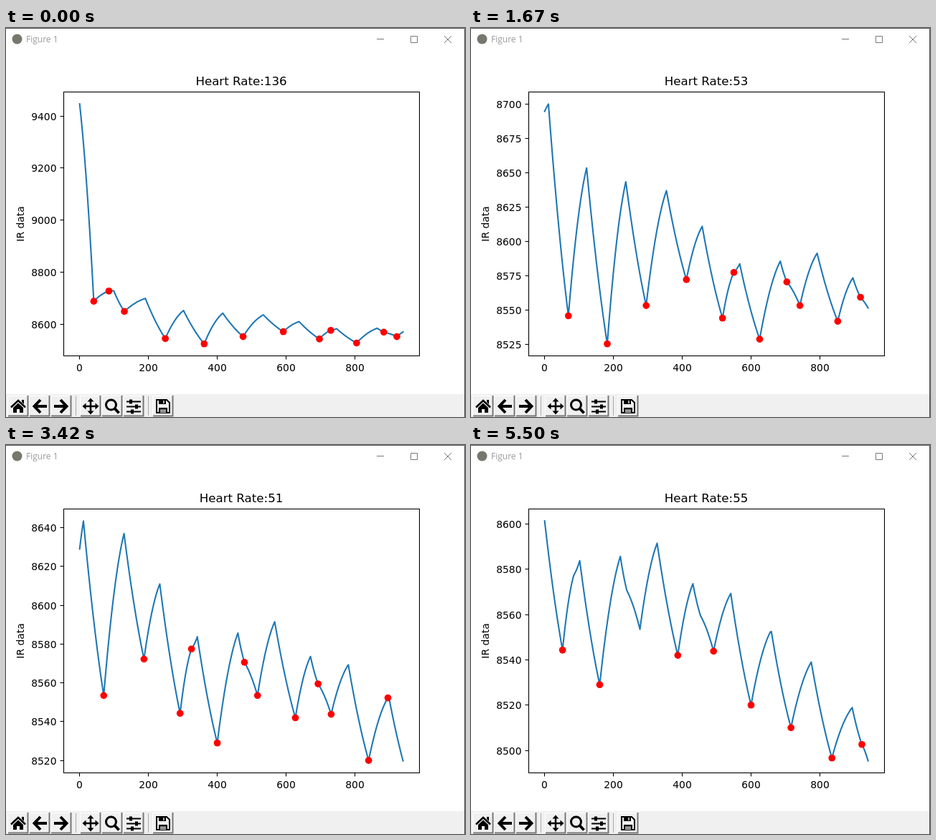
Recreate the animation shown at these times as an HTML page. Size 640 by 544 pixels, loop 5.58 s.

```html
<!DOCTYPE html>
<html lang="en">
<head>
<meta charset="utf-8">
<title>Figure 1</title>
<style>
  html, body { margin: 0; width: 100%; height: 100%; overflow: hidden; background: #fff; }
  svg { display: block; width: 640px; height: 544px; }
  text { font: 13.89px "DejaVu Sans", sans-serif; fill: #000; }
  #title { font-size: 16.67px; }
  .caption { font: 12px "Open Sans", sans-serif; fill: #999; }
  .controls { fill: none; stroke: #777; }
  .axes { fill: none; stroke: #000; stroke-width: 1.1; }
  .icons { fill: none; stroke: #000; stroke-width: 3; }
  .icons .solid { fill: #000; stroke: none; }
  #curve { fill: none; stroke: #1f77b4; stroke-width: 2.08; stroke-linejoin: round; stroke-linecap: square; }
  #marks { fill: #f00; }
</style>
</head>
<body>
<svg viewBox="0 0 640 544">
  <rect width="640" height="544" fill="#fff"/>
  <circle cx="15.5" cy="15.5" r="7" fill="#77786c"/>
  <text class="caption" x="28" y="20">Figure 1</text>
  <path class="controls" d="M517 15.5h10M564.5 11.5h9v9h-9zM611 11l10 10M621 11l-10 10"/>

  <rect y="512" width="640" height="32" fill="#f0f0f0"/>
  <path d="M0 .5H639.5V544" fill="none" stroke="#555"/>
  <g id="buttons"></g>
  <path d="M97.5 515v27M198.5 515v27" stroke="#a9a9a9"/>
  <g class="icons">
    <path d="M7 530.5L17 521l10 9.5" stroke-width="2.5"/>
    <path class="solid" d="M17 524.5l7 6.5v7h-5v-5h-4v5h-5v-7zM22 520h3v6l-3-3z"/>
    <path d="M48 520l-8.5 9 8.5 9M40 529h17" stroke-width="4"/>
    <path d="M76 520l8.5 9-8.5 9M84 529H67" stroke-width="4"/>
    <path d="M118 521v16M110 529h16" stroke-width="2.5"/>
    <path class="solid" d="M118 517.5l4.5 5h-9zM118 540.5l4.5-5h-9zM106.5 529l5-4.5v9zM129.5 529l-5-4.5v9z"/>
    <circle cx="146.5" cy="527" r="7"/>
    <path d="M151.5 532l6 6.5" stroke-width="4"/>
    <path d="M168 522.5h20M168 529.5h20M168 536.5h20" stroke-width="2"/>
    <path d="M174 519.5v6M182 526.5v6M176 533.5v6" stroke-width="4"/>
    <path d="M210 520h14l4 4v14h-18z" stroke-width="2"/>
    <path class="solid" d="M213 519h10v7h-10zM213 531h12v8h-12z"/>
    <path d="M220 521v4M215 534.5h8M215 537h8" stroke="#f0f0f0" stroke-width="1.4"/>
  </g>

  <text id="title" x="328" y="80" text-anchor="middle"></text>
  <text transform="translate(25 274) rotate(-90)" text-anchor="middle">IR data</text>
  <g id="ticksX"></g>
  <g id="ticksY"></g>
  <path id="curve"/>
  <g id="marks"></g>
  <rect class="axes" x="80.5" y="89.5" width="496" height="369"/>
</svg>
<script>
const LOOP = 5580, FRAME_MS = 250 / 3, LAST_FRAME = 66;
const SPAN = 940, BASE = 8500, RISE_BEND = 0.5, FALL_BEND = 0.25, SHOULDER_BEND = -0.35;
const LEFT = 102.7, WIDTH = 450.9, TOP = 89.5, HEIGHT = 369, MARGIN = 0.05;
const $ = id => document.getElementById(id);

// Peaks, dips and shoulders of the pulse: sample, level above BASE.
const knots = [
  [0, 946], [41, 189], [85, 228.5], [99, 229.5], [130, 150], [191, 200], [249, 46],
  [302, 153.5], [362, 25.6], [416, 143.5], [475, 53.5], [534, 137], [592, 72.3],
  [638, 111], [697, 44.3], [730, 77.5], [747, 83.8], [805, 29], [865, 85.7], [884, 70.6],
  [922, 53.5], [972, 91.5], [1032, 42], [1076, 73.6], [1098, 59.5], [1136, 43.8],
  [1186, 69.3], [1245, 20], [1301, 52.3], [1304, 52.5], [1361, 10], [1420, 39],
  [1480, -3.4], [1539, 18.9], [1567, 2.6], [1586, -5.2]
];
// Frame, first visible sample.
const scroll = [[0, 0], [20, 180], [28, 270], [41, 405], [66, 645]];

const segmentAt = (points, x) => Math.max(0, points.findIndex(p => p[0] >= x) - 1);

function interpolate(points, x, bendOf = () => 0) {
  const i = segmentAt(points, x), [x0, y0] = points[i], [x1, y1] = points[i + 1];
  const t = (x - x0) / (x1 - x0);
  return y0 + (y1 - y0) * (t + bendOf(i) * t * (1 - t));
}

const rises = i => knots[i + 1]?.[1] > knots[i][1];
const turns = i => i > 0 && rises(i) !== rises(i - 1);
const isPeak = i => turns(i) && !rises(i);
const bend = i => !turns(i) ? SHOULDER_BEND : rises(i) ? RISE_BEND : FALL_BEND;

const signal = Array.from({ length: 1586 }, (_, x) => BASE + interpolate(knots, x, bend));
const beats = knots.filter((_, i) => !isPeak(i)).map(k => k[0]);

function tickStep(range) {
  const raw = range / 9, power = 10 ** Math.floor(Math.log10(raw));
  return power * [1, 2, 2.5, 5, 10].find(m => m * power >= raw);
}

const toX = i => LEFT + i / SPAN * WIDTH;
const snap = v => Math.round(v - 0.5) + 0.5;

function draw(frame) {
  const start = Math.round(interpolate(scroll, frame) / 5) * 5;
  const view = signal.slice(start, start + SPAN + 1);
  const max = Math.max(...view), min = Math.min(...view);
  const low = min - (max - min) * MARGIN, range = (max - min) * (1 + 2 * MARGIN);
  const toY = v => TOP + HEIGHT * (1 - (v - low) / range);

  $("curve").setAttribute("d", "M" + view.map((v, i) => toX(i).toFixed(2) + " " + toY(v).toFixed(2)).join("L"));

  // Only beats in the lower half of the visible range count.
  const found = beats.filter(b => b > start && b < start + SPAN && signal[b] < (max + min) / 2);
  $("marks").innerHTML = found.map(b =>
    `<circle cx="${toX(b - start)}" cy="${toY(signal[b])}" r="4.85"/>`).join("");
  $("title").textContent = "Heart Rate:" + Math.floor(6000 / (found[1] - found[0]));

  const step = tickStep(range);
  let ticks = "";
  for (let v = Math.ceil(low / step) * step; v <= low + range; v += step) {
    const y = snap(toY(v));
    ticks += `<path class="axes" d="M75.5 ${y}H80.5"/><text x="70.5" y="${y + 5}" text-anchor="end">${v}</text>`;
  }
  $("ticksY").innerHTML = ticks;
}

$("ticksX").innerHTML = [0, 200, 400, 600, 800].map(v => {
  const x = snap(toX(v));
  return `<path class="axes" d="M${x} 458.5v5"/><text x="${x}" y="479.5" text-anchor="middle">${v}</text>`;
}).join("");

$("buttons").innerHTML = [2, 32, 62, 103, 133, 163, 204].map(x =>
  `<path d="M${x + 0.5} 543V514.5H${x + 29}" fill="none" stroke="#fff"/>
   <path d="M${x + 1} 542.5H${x + 28.5}V514" fill="none" stroke="#777" stroke-width="2"/>`).join("");

let shown = -1;
function tick() {
  // Frames start on whole hundredths of a second.
  const t = Math.floor(performance.now() % LOOP / 10) * 10;
  const frame = Math.min(LAST_FRAME, Math.floor((t + 5) / FRAME_MS));
  if (frame !== shown) draw(shown = frame);
  requestAnimationFrame(tick);
}
tick();
</script>
</body>
</html>
```
